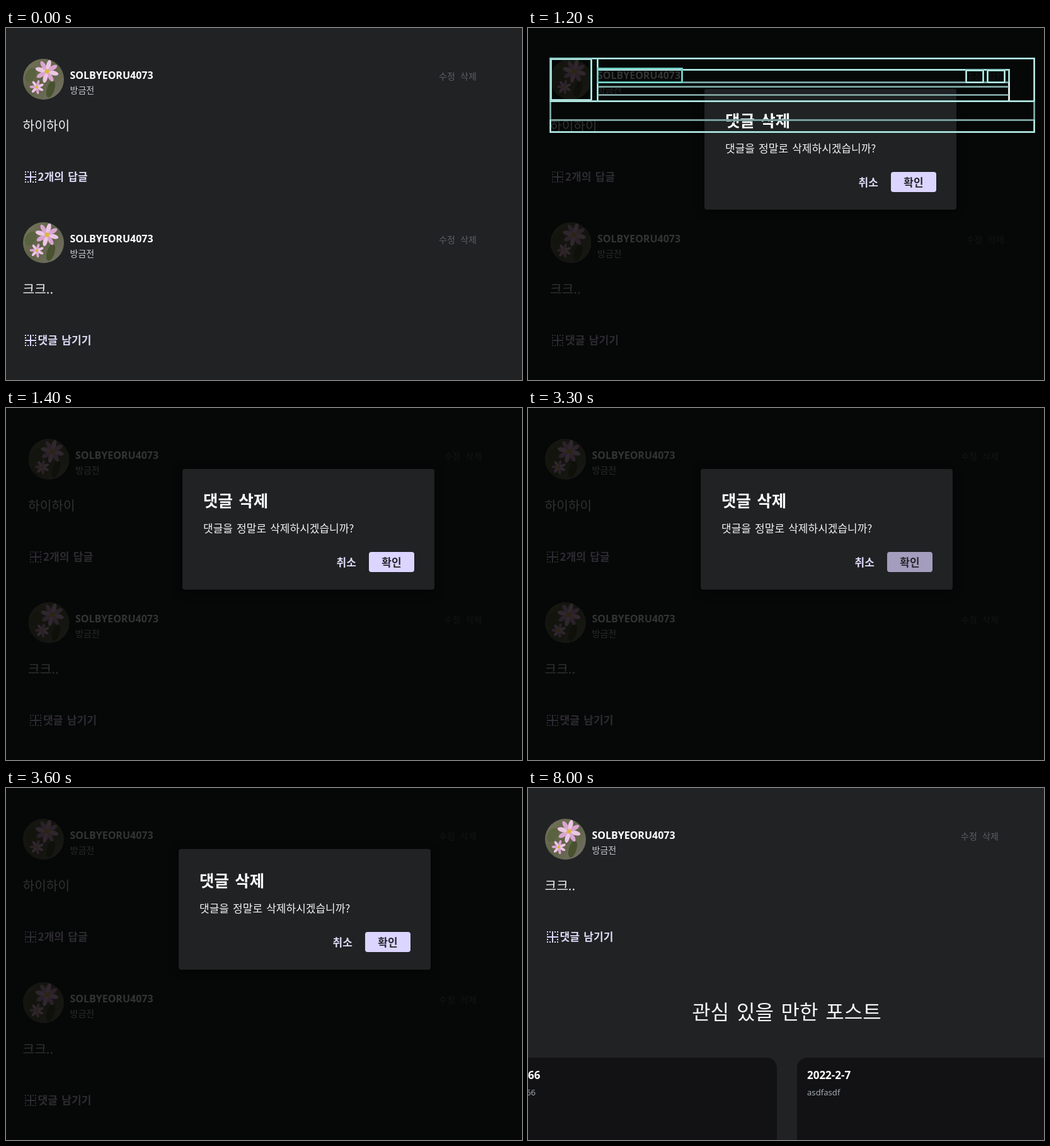
An HTML page with a canvas for the animation above (9100 ms loop, 819x560 px).

```html
<!DOCTYPE html>
<html lang="ko">
<head>
<meta charset="utf-8">
<title>댓글 삭제</title>
<style>
html, body { margin: 0; width: 100%; height: 100%; overflow: hidden; background: #202224; }
canvas { display: block; }
</style>
</head>
<body>
<canvas id="stage" width="819" height="560"></canvas>
<script>
const W = 819, H = 560, LOOP = 9100;
const ctx = document.getElementById('stage').getContext('2d');
const KO = '"Noto Sans CJK KR", "Noto Sans CJK", sans-serif';
const LATIN = '"Open Sans", "Noto Sans", sans-serif';
const BG = '#202224', LILAC = '#dbd5ff', MUTED = '#5b6065';
const USER = 'SOLBYEORU4073';

function text(str, x, y, size, color, weight = 400, family = KO, align = 'left') {
  ctx.font = `${weight} ${size}px ${family}`;
  ctx.wordSpacing = size * 0.14 + 'px';
  ctx.textAlign = align;
  ctx.fillStyle = color;
  ctx.fillText(str, x, y);
}

function roundRect(x, y, w, h, r, color) {
  ctx.fillStyle = color;
  ctx.beginPath();
  ctx.roundRect(x, y, w, h, r);
  ctx.fill();
}

function ellipse(x, y, rx, ry, angle, color) {
  ctx.fillStyle = color;
  ctx.beginPath();
  ctx.ellipse(x, y, rx, ry, angle, 0, Math.PI * 2);
  ctx.fill();
}

function flower(x, y, r, petals, turn) {
  for (let i = 0; i < petals; i++) {
    const a = turn + i * Math.PI * 2 / petals;
    ellipse(x + Math.cos(a) * r * 0.58, y + Math.sin(a) * r * 0.58,
      r * 0.46, r * 0.2, a, i % 2 ? '#d9a5cf' : '#ecc6e4');
  }
  ellipse(x, y, r * 0.2, r * 0.2, 0, '#d8b93c');
}

function avatar(x, y) {
  ctx.save();
  ctx.translate(x, y);
  ctx.beginPath();
  ctx.arc(32.5, 32.5, 32.5, 0, Math.PI * 2);
  ctx.clip();
  const g = ctx.createLinearGradient(0, 0, 65, 65);
  g.addColorStop(0, '#77755f');
  g.addColorStop(0.5, '#5f6246');
  g.addColorStop(1, '#77746a');
  ctx.fillStyle = g;
  ctx.fillRect(0, 0, 65, 65);
  ellipse(12, 26, 8, 12, 0.5, '#59633f');
  ellipse(44, 48, 6, 14, 0.3, '#48522f');
  flower(38, 20, 18, 8, 0.25);
  flower(22, 45, 11, 7, 0.5);
  ctx.restore();
}

// dotted frame around a solid plus
function expandIcon(x, y) {
  ctx.fillStyle = LILAC;
  for (const p of [3, 7, 15, 19]) {
    for (const edge of [3, 19]) {
      ctx.fillRect(x + p, y + edge, 2, 2);
      ctx.fillRect(x + edge, y + p, 2, 2);
    }
  }
  ctx.fillRect(x + 3, y + 11, 18, 2);
  ctx.fillRect(x + 11, y + 3, 2, 18);
}

function comment(x, y, body, reply, deleteColor = MUTED) {
  avatar(x + 27, y + 49);
  text(USER, x + 101.5, y + 81, 16, '#fff', 700, LATIN);
  text('방금전', x + 101.5, y + 104, 14, '#c6cad0');
  text('수정', x + 687, y + 82, 14, MUTED);
  text('삭제', x + 721, y + 82, 14, deleteColor);
  text(body, x + 26.5, y + 163, 20.3, '#f1f1f3');
  expandIcon(Math.floor(x) + 27, y + 225);
  text(reply, x + 50.5, y + 243, 17.1, '#e0daf6', 700);
}

function commentList(x, hover) {
  comment(x, 0, '하이하이', '2개의 답글', hover ? '#7c8288' : MUTED);
  comment(x, 260, '크크..', '댓글 남기기');
}

function dialog(x, pressed) {
  ctx.fillStyle = 'rgba(0,0,0,.8)';
  ctx.fillRect(0, 0, W, H);
  ctx.save();
  ctx.shadowColor = 'rgba(0,0,0,.5)';
  ctx.shadowBlur = 14;
  ctx.shadowOffsetY = 3;
  roundRect(x, 97, 400, 192, 4, BG);
  ctx.restore();
  text('댓글 삭제', x + 33, 157, 25.5, '#fff', 700);
  text('댓글을 정말로 삭제하시겠습니까?', x + 33, 198, 17, '#f4f4f6');
  text('취소', x + 244.5, 252, 17, '#e0daf6', 700);
  roundRect(x + 296, 229, 72, 32, 4, pressed ? '#a49dbe' : LILAC);
  text('확인', x + 332, 252, 17, '#26262c', 700, KO, 'center');
}

function card(x, title, sub, titleX, subX, align) {
  roundRect(x, 429, 416, 300, 16, '#121214');
  text(title, titleX, 463, 17, '#fff', 700, LATIN, align);
  text(sub, subX, 489, 13.2, '#adb3ba', 400, LATIN, align);
}

function posts() {
  comment(0, 0, '크크..', '댓글 남기기');
  text('관심 있을 만한 포스트', 410.5, 367.5, 32.1, '#f6f6f6', 400, KO, 'center');
  card(-21, '666', '666', 19.5, 12, 'right');
  card(427, '2022-2-7', 'asdfasdf', 443, 443, 'left');
}

// repaint outlines: [band, core] colours
const BRIGHT = ['#78bfb8', '#e9fcfa'];
const SOFT = ['#6c9794', '#86aaa7'];
const PALE = ['#4f7673', '#b4cfcd'];
const TEAL = ['#58b3aa', '#8eeae0'];
const WHITE = ['#c3d2d2', '#ffffff'];

function outline(l, t, r, b, [band, core] = BRIGHT) {
  for (const [width, color] of [[3, band], [1, core]]) {
    ctx.lineWidth = width;
    ctx.strokeStyle = color;
    ctx.strokeRect(l + 0.5, t + 0.5, r - l, b - t);
  }
}

const hline = (y, l, r, style) => outline(l, y, r, y, style);
const vline = (x, t, b, style) => outline(x, t, x, b, style);

function commentOutlines(x) {
  vline(x + 26, 116, 146, SOFT);
  vline(x + 794, 116, 146, SOFT);
  outline(x + 26, 48, x + 794, 116);
  outline(x + 26, 146, x + 794, 165);
  hline(146, x + 27, x + 793, SOFT);
  vline(x + 101, 48, 116);
  outline(x + 27, 49, x + 91, 114);
  outline(x + 101, 66, x + 754, 86);
  hline(86, x + 102, x + 753, SOFT);
  vline(x + 754, 86, 116, WHITE);
  hline(93, x + 102, x + 753, SOFT);
  hline(106, x + 102, x + 753, PALE);
  outline(x + 101, 64, x + 235, 86, TEAL);
  outline(x + 686, 67, x + 713, 86);
  outline(x + 720, 67, x + 747, 86);
}

function pageOutlines() {
  commentOutlines(0);
  vline(26, -5, 249);
  vline(794, -5, 249, WHITE);
  hline(225, 27, 793, SOFT);
  hline(249, -5, W + 5, PALE);
  hline(299, -5, W + 5, SOFT);
  hline(339, -5, W + 5, TEAL);
  hline(370, -5, W + 5, PALE);
  hline(429, 396, 425, SOFT);
  outline(-9, 429, 394, H + 9);
  outline(426, 429, W + 9, H + 9);
  vline(394, 430, H + 9, WHITE);
  vline(410, -5, 529, TEAL);
  ctx.fillStyle = '#8c9094';
  ctx.fillRect(66, 559, 6, 1);
  ctx.fillRect(529, 559, 6, 1);
}

function draw(t) {
  ctx.fillStyle = BG;
  ctx.fillRect(0, 0, W, H);
  if (t >= 7700) {
    posts();
    if (t < 8000) pageOutlines();
    return;
  }
  // the scrollbar is hidden while the dialog opens, which nudges the layout
  const nudged = t >= 1200 && t < 3300;
  commentList(nudged ? 8.5 : 0, t >= 600 && t < 1200);
  if (t >= 1200) dialog(nudged ? 280 : 274, t >= 2400 && t < 3600);
  if (t >= 1200 && t < 1400) commentOutlines(9);
}

const start = performance.now();
function tick() {
  draw((performance.now() - start) % LOOP);
  requestAnimationFrame(tick);
}
tick();
</script>
</body>
</html>
```
